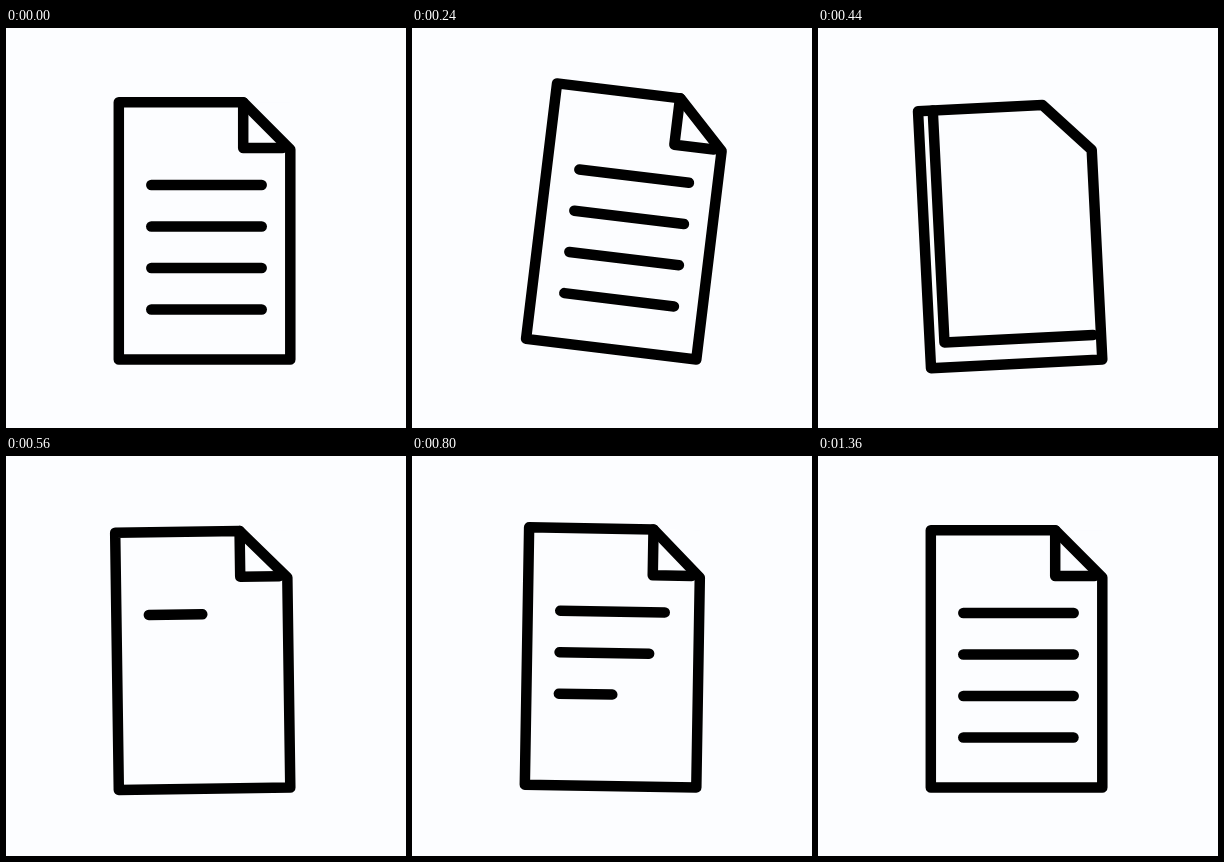
An HTML page with a canvas for the animation above (1.96 s loop, 400 px wide and 400 px high).

```html
<!DOCTYPE html>
<html lang="en">
<head>
<meta charset="utf-8">
<title>Page turn</title>
<style>
  html, body { margin: 0; width: 100%; height: 100%; overflow: hidden; background: #fcfdff; }
  canvas { display: block; }
</style>
</head>
<body>
<canvas width="400" height="400"></canvas>
<script>
const ctx = document.querySelector('canvas').getContext('2d');
const LOOP = 1960, PAPER = '#fcfdff';
const LEFT = 112.8, TOP = 74.2, RIGHT = 284.3, BOTTOM = 331.5;
const FOLD_X = 237.2, FOLD_Y = 120;
const SWINGS = [0, 7, -3, 2, 0], SWING_MS = 228;
const TURN_START = 240, TURN_END = 468;
const LINE_MS = 750, LINE_DELAY = 120;

const clamp = v => Math.min(1, Math.max(0, v));
const mix = (a, b, p) => a + (b - a) * p;
const easeInOut = p => (1 - Math.cos(Math.PI * p)) / 2;
const easeOut = p => 1 - (1 - p) ** 5;

function swingAngle(t) {
  const step = Math.min(Math.floor(t / SWING_MS), SWINGS.length - 2);
  const p = easeInOut(clamp(t / SWING_MS - step));
  return mix(SWINGS[step], SWINGS[step + 1], p) * Math.PI / 180;
}

function stroke(points, closed) {
  ctx.beginPath();
  points.forEach(([x, y]) => ctx.lineTo(x, y));
  if (closed) ctx.closePath();
  ctx.stroke();
}

function drawLines(t) {
  for (let i = 0; i < 4; i++) {
    const p = t < TURN_END ? 1 : easeOut(clamp((t - TURN_END - i * LINE_DELAY) / LINE_MS));
    const y = 157 + i * 41.5;
    if (p > 0) stroke([[145.3, y], [mix(145.3, 255.7, p), y]]);
  }
}

// The corner flap grows over the page and hides the lines.
function drawFlap(t) {
  const p = t < TURN_END ? clamp((t - TURN_START) / (TURN_END - TURN_START)) : 0;
  const x = mix(FOLD_X, LEFT, p), y = mix(FOLD_Y, BOTTOM, p);
  ctx.fillRect(x, TOP, RIGHT - x, y - TOP);
  stroke([[x, TOP], [x, y], [276.3, y]]);
}

function draw(t) {
  ctx.setTransform(1, 0, 0, 1, 0, 0);
  ctx.fillStyle = PAPER;
  ctx.fillRect(0, 0, 400, 400);
  ctx.lineWidth = 10.5;
  ctx.lineCap = ctx.lineJoin = 'round';
  ctx.translate(RIGHT, BOTTOM);
  ctx.rotate(swingAngle(t));
  ctx.translate(-RIGHT, -BOTTOM);
  drawLines(t);
  drawFlap(t);
  stroke([[LEFT, TOP], [FOLD_X, TOP], [RIGHT, 121.5], [RIGHT, BOTTOM], [LEFT, BOTTOM]], true);
}

function tick() {
  draw(performance.now() % LOOP);
  requestAnimationFrame(tick);
}
tick();
</script>
</body>
</html>
```
